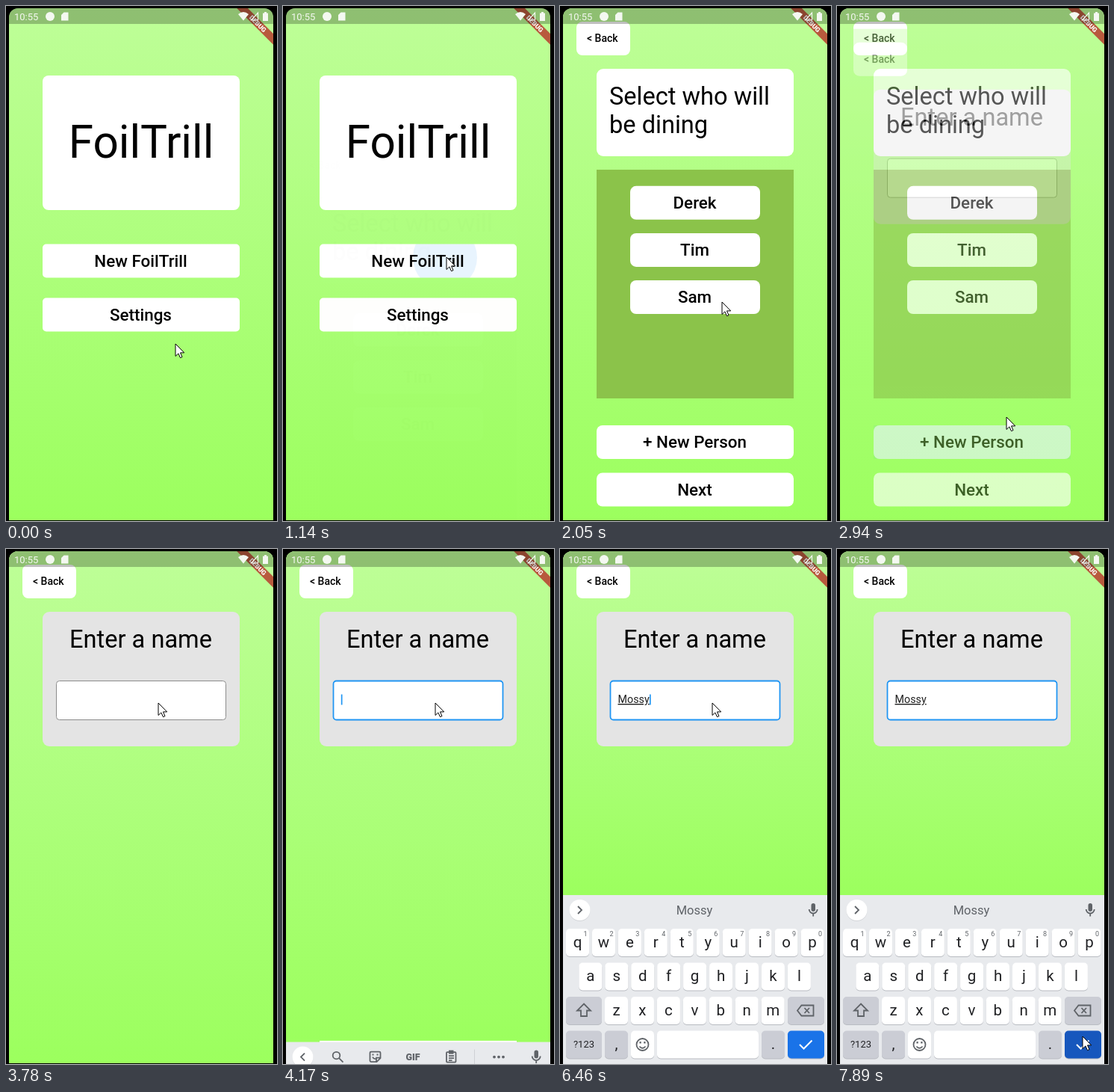
An HTML page that plays this animation: 363x689 px, repeating every 8 s.

```html
<!DOCTYPE html>
<html lang="en">
<head>
<meta charset="utf-8">
<title>Bill app walkthrough</title>
<style>
html, body { margin: 0; width: 100%; height: 100%; overflow: hidden; background: #000; }
svg { display: block; }
text { font-family: Roboto, Arial, sans-serif; white-space: pre; }
.mid { text-anchor: middle; }
.btn { font-size: 22.4px; font-weight: 500; text-anchor: middle; }
.head { font-size: 32.6px; }
.back { font-size: 14px; font-weight: 500; }
.white { fill: #fff; }
.line { fill: none; stroke: #5f6368; stroke-width: 1.8; }
.fill { fill: #5f6368; }
.key { font-size: 20.5px; fill: #202124; text-anchor: middle; }
.digit { font-size: 9px; fill: #5f6368; text-anchor: middle; }
.word { font-size: 16.5px; fill: #5f6368; text-anchor: middle; }
</style>
</head>
<body>
<svg id="stage" width="363" height="689" viewBox="0 0 363 689">
  <defs>
    <linearGradient id="lime" x2="0" y2="1">
      <stop stop-color="#befe98"/><stop offset="1" stop-color="#9cff5e"/>
    </linearGradient>
    <clipPath id="screen"><path d="M4 689V15a12 12 0 0 1 12-12H346a12 12 0 0 1 12 12V689z"/></clipPath>
  </defs>
  <rect width="363" height="689"/>
  <g clip-path="url(#screen)">
    <g id="home">
      <rect x="4" y="3" width="354" height="685" fill="url(#lime)"/>
      <rect class="white" x="49" y="93" width="264" height="180" rx="8"/>
      <text class="mid" x="181" y="203" font-size="60.3">FoilTrill</text>
      <rect class="white" x="49" y="318.5" width="264" height="45" rx="5"/>
      <svg x="49" y="318.5" width="264" height="45"><circle id="tap1" cx="168" cy="18" fill="#2196f3" opacity=".1"/></svg>
      <text class="btn" x="180.5" y="349">New FoilTrill</text>
      <rect class="white" x="49" y="390.5" width="264" height="45" rx="5"/>
      <text class="btn" x="180.5" y="421">Settings</text>
    </g>
    <g id="diners">
      <rect x="4" y="3" width="354" height="685" fill="url(#lime)"/>
      <rect class="white" x="22" y="21" width="72" height="45" rx="8"/>
      <text class="back" x="36" y="48">&lt; Back</text>
      <rect class="white" x="49" y="84" width="264" height="117" rx="9"/>
      <text class="head" x="66" y="132">Select who will</text>
      <text class="head" x="66" y="170">be dining</text>
      <rect x="49" y="219" width="264" height="306" fill="#8bc34a"/>
      <g id="people"></g>
      <rect class="white" x="49" y="561" width="264" height="45" rx="8"/>
      <svg x="49" y="561" width="264" height="45"><circle id="tap2" cx="178" cy="9" fill="#2196f3" opacity=".11"/></svg>
      <text class="btn" x="180.5" y="591">+ New Person</text>
      <rect class="white" x="49" y="624.5" width="264" height="45" rx="8"/>
      <text class="btn" x="180.5" y="654.5">Next</text>
    </g>
    <g id="entry">
      <rect id="body" x="4" y="3" width="354" height="685" fill="url(#lime)"/>
      <rect class="white" x="22" y="21" width="72" height="45" rx="8"/>
      <text class="back" x="36" y="48">&lt; Back</text>
      <rect x="49" y="84" width="264" height="180" rx="9" fill="#e4e4e4"/>
      <text class="head mid" x="180.5" y="132">Enter a name</text>
      <rect id="field" class="white" x="67.5" y="176.5" width="227" height="52" rx="4"/>
      <text id="typed" x="77.5" y="206" font-size="14.3" fill="#222"></text>
      <rect id="caret" y="194.5" width="1.7" height="14" fill="#2196f3"/>
    </g>
    <g id="board">
      <rect x="4" y="463" width="354" height="226" fill="#e8eaed"/>
      <circle cx="26.5" cy="484" r="14" fill="#d3d5d9"/>
      <circle class="white" cx="26.5" cy="483" r="14"/>
      <path id="chevron" class="line"/>
      <g id="tools">
        <circle class="line" cx="71.5" cy="481" r="4.8"/>
        <path class="line" d="M75 484.500l5.500 5.500"/>
        <path class="line" d="M118 476h11q1.500 0 1.500 1.500v7l-5 5h-7.500q-1.500 0-1.500-1.500v-10.500q0-1.500 1.500-1.500zM130 484h-5v5M120 483q1.500 3 4 2.500"/>
        <path class="fill" d="M119.500 479h2v2h-2zM125.500 479h2v2h-2z"/>
        <text class="mid fill" x="174" y="487" font-size="12.5" font-weight="900">GIF</text>
        <rect class="line" x="219" y="476.500" width="12.500" height="13.500" rx="1"/>
        <path class="fill" d="M222 474h6.500v5h-6.500z"/>
        <path class="line" stroke-width="1.400" d="M222 481.500h7M222 484.500h7M222 487.500h4.500"/>
        <path d="M256.500 473v20" stroke="#cfd1d5"/>
        <g class="fill"><circle cx="283" cy="483" r="1.900"/><circle cx="289" cy="483" r="1.900"/><circle cx="295" cy="483" r="1.900"/></g>
      </g>
      <text class="word" x="86" y="489"></text>
      <text class="word" x="180" y="489"></text>
      <text class="word" x="279" y="489"></text>
      <rect class="fill" x="336.500" y="474" width="5.500" height="11" rx="2.750"/>
      <path class="line" d="M333.700 482a5.500 5.500 0 0 0 11 0M339.200 487.500v4"/>
      <g id="keys"></g>
      <path class="line" d="M32 608.500l9 9h-5v7.500h-8v-7.500h-5z"/>
      <path class="line" d="M318 617.500l5.500-7h16v14h-16zM327.500 614l6.500 7M334 614l-6.500 7"/>
      <circle class="line" cx="110.500" cy="663" r="8"/>
      <path class="line" d="M106.500 665.500q4 4.500 8 0"/>
      <path class="fill" d="M106.500 659h2.200v2.500h-2.200zM112.300 659h2.200v2.500h-2.200z"/>
      <path d="M321 663l5.500 5.500 11-11" fill="none" stroke="#fff" stroke-width="2"/>
    </g>
    <g transform="translate(358 3) rotate(45)">
      <rect x="-40" y="24.1" width="80" height="10.400" fill="#b71c1c" opacity=".72"/>
      <text class="mid white" y="32.400" font-size="8.800" font-weight="900">DEBUG</text>
    </g>
    <rect x="4" y="3" width="354" height="21" opacity=".25"/>
    <g fill="#f4f8f1">
      <text x="11" y="18.500" font-size="13">10:55</text>
      <circle cx="59" cy="14" r="6"/>
      <path d="M77.500 8.500h6v11h-9.500v-7.500z"/>
      <path d="M311 11q7-6 14 0l-7 8.500z"/>
      <path d="M337.500 9v10h-9z" fill="none" stroke="#f4f8f1" stroke-width="1.200"/>
      <path d="M344 9.500h2v-1.500h3v1.500h2v10.500h-7z"/>
    </g>
  </g>
  <path id="mouse" d="M0 0V16.500L3.900 12.900 6.500 18.700 9 17.600 6.500 11.900H11.700z" fill="#fff" stroke="#000" stroke-linejoin="round"/>
</svg>
<script>
const $ = id => document.getElementById(id);
const set = (el, attrs) => { for (const k in attrs) el.setAttribute(k, attrs[k]); };
const clamp = v => Math.min(1, Math.max(0, v));

// cubic bezier easing, solved by bisection
function bezier(x1, y1, x2, y2) {
  const at = (a, b, s) => 3 * (1 - s) * (1 - s) * s * a + 3 * (1 - s) * s * s * b + s * s * s;
  return x => {
    if (x <= 0 || x >= 1) return clamp(x);
    let lo = 0, hi = 1;
    for (let i = 0; i < 24; i++) {
      const m = (lo + hi) / 2;
      if (at(x1, x2, m) < x) lo = m; else hi = m;
    }
    return at(y1, y2, lo);
  };
}
const fastOutSlowIn = bezier(.4, 0, .2, 1);
const easeIn = bezier(.42, 0, 1, 1);

$('people').innerHTML = ['Derek', 'Tim', 'Sam'].map((name, i) => {
  const y = 240.8 + i * 63.1;
  return `<rect class="white" x="94" y="${y}" width="174" height="45" rx="8"/>
    <text class="btn" x="180.5" y="${y + 30.3}">${name}</text>`;
}).join('');

function key(x, y, w, label = '', fill = '#fff', size = 20.5, id = '') {
  return `<rect x="${x}" y="${y + 1}" width="${w}" height="37" rx="5" fill="#b9bcc2"/>
    <rect id="${id}" x="${x}" y="${y}" width="${w}" height="37" rx="5" fill="${fill}"/>
    <text class="key" x="${x + w / 2}" y="${y + 18 + size * .32}" style="font-size:${size}px">${label}</text>`;
}
const row = (letters, x, y) =>
  [...letters].map((c, i) => key(x + i * 34.95, y, 31, c)).join('');
const digits = [...'1234567890'].map((d, i) =>
  `<text class="digit" x="${34 + i * 34.95}" y="518">${d}</text>`).join('');
const grey = '#cbcdd5';
$('keys').innerHTML = row('qwertyuiop', 8, 508) + digits +
  row('asdfghjkl', 25.3, 553.5) + row('zxcvbnm', 60, 599) +
  key(8, 599, 48, '', grey) + key(305, 599, 49, '', grey) +
  key(8, 644.5, 48, '?123', grey, 13) + key(60, 644.5, 31, ',', grey) +
  key(95, 644.5, 31) + key(130, 644.5, 136) +
  key(270, 644.5, 31, '.', grey) + key(305, 644.5, 49, '', '#1a73e8', 20, 'enter');

// bursts of movement: start time and number of 120 ms ticks
const bursts = [[0, 1], [500, 3], [890, 4], [1400, 3], [2050, 3], [2440, 2], [2820, 7],
  [3660, 2], [4050, 4], [4940, 1], [5440, 1], [5940, 1], [6190, 2], [6460, 1],
  [6840, 3], [7230, 2], [7510, 2], [7770, 2]];
function hold(t) {
  const [start, n] = bursts.filter(b => b[0] <= t).pop();
  return start + 120 * Math.min(n - 1, Math.floor((t - start) / 120));
}

// pointer path: time, x, y
const path = [[0, 227, 452], [500, 224, 425], [740, 216, 306], [890, 218, 320],
  [1010, 219, 336], [1250, 219, 336], [1640, 213, 342], [2050, 217, 396],
  [2290, 230, 554], [2440, 228, 564], [2560, 227, 569], [2820, 227, 566],
  [2940, 227, 550], [3060, 230, 440], [3180, 232, 340], [3300, 232, 288],
  [3420, 216, 235], [3540, 204, 212], [3780, 204, 206], [6460, 204, 206],
  [6840, 212, 240], [6960, 238, 330], [7080, 271, 422], [7230, 331, 636],
  [7350, 326, 598], [7510, 327, 622], [7630, 331, 642], [7890, 329, 652]];
function pointer(t) {
  const i = path.findIndex(p => p[0] >= t);
  if (i < 1) return path[0].slice(1);
  const [a, b] = [path[i - 1], path[i]], k = (t - a[0]) / (b[0] - a[0]);
  return [a[1] + (b[1] - a[1]) * k, a[2] + (b[2] - a[2]) * k];
}

// last value whose time has come
const pick = (t, list) => list.filter(e => e[0] <= t).pop()[1];
const typing = [[0, ''], [5940, 'M'], [6190, 'Mos'], [6310, 'Mossy']];
const hints = [[0, []], [6190, ['Moss', 'Mos', 'Most']],
  [6310, ['Moss', 'Mossy', 'Mostly']], [6460, ['', 'Mossy', '']]];
const blink = [[0, 0], [4050, 1], [4410, 0], [4940, 1], [5440, 0], [5940, 1],
  [6840, 0], [7350, 1], [7890, 0]];
const words = document.querySelectorAll('.word');

function enterPage(el, t, start) {
  const k = clamp((t - start) / 300);
  set(el, {
    opacity: easeIn(k),
    transform: `translate(0 ${171 * (1 - fastOutSlowIn(k))})`
  });
}
const ripple = (t, down, up) =>
  43 * clamp((t - down) / 120) + 240 * clamp((t - up) / 225);

function draw(now) {
  const t = hold(now % 8000);
  set($('tap1'), { r: ripple(t, 1010, 1130) });
  set($('tap2'), { r: ripple(t, 2690, 2775) });
  enterPage($('diners'), t, 1115);
  enterPage($('entry'), t, 2773);

  const up = fastOutSlowIn(clamp((t - 4110) / 300));
  set($('board'), { transform: `translate(0 ${227 * (1 - up)})` });
  set($('body'), { height: 685 - 225 * up });

  const focus = t >= 4050, writing = t >= 5940;
  set($('field'), { stroke: focus ? '#2196f3' : '#8c8c8c', 'stroke-width': focus ? 1.8 : 1 });
  const typed = $('typed');
  typed.textContent = pick(t, typing);
  set(typed, { 'text-decoration': t >= 6460 ? 'underline' : 'none' });
  set($('caret'), { x: 77.8 + typed.getComputedTextLength(), opacity: pick(t, blink) });

  set($('tools'), { opacity: writing ? 0 : 1 });
  set($('chevron'), { d: writing ? 'M24 478l5 5-5 5' : 'M29 478l-5 5 5 5' });
  words.forEach((w, i) => w.textContent = pick(t, hints)[i] || '');
  set($('enter'), { fill: t >= 7770 ? '#1757bd' : '#1a73e8' });

  const [x, y] = pointer(t);
  set($('mouse'), { transform: `translate(${x} ${y})` });
}

let begin;
function loop(now) {
  begin ??= now;
  draw(now - begin);
  requestAnimationFrame(loop);
}
draw(0);
requestAnimationFrame(loop);
</script>
</body>
</html>
```
